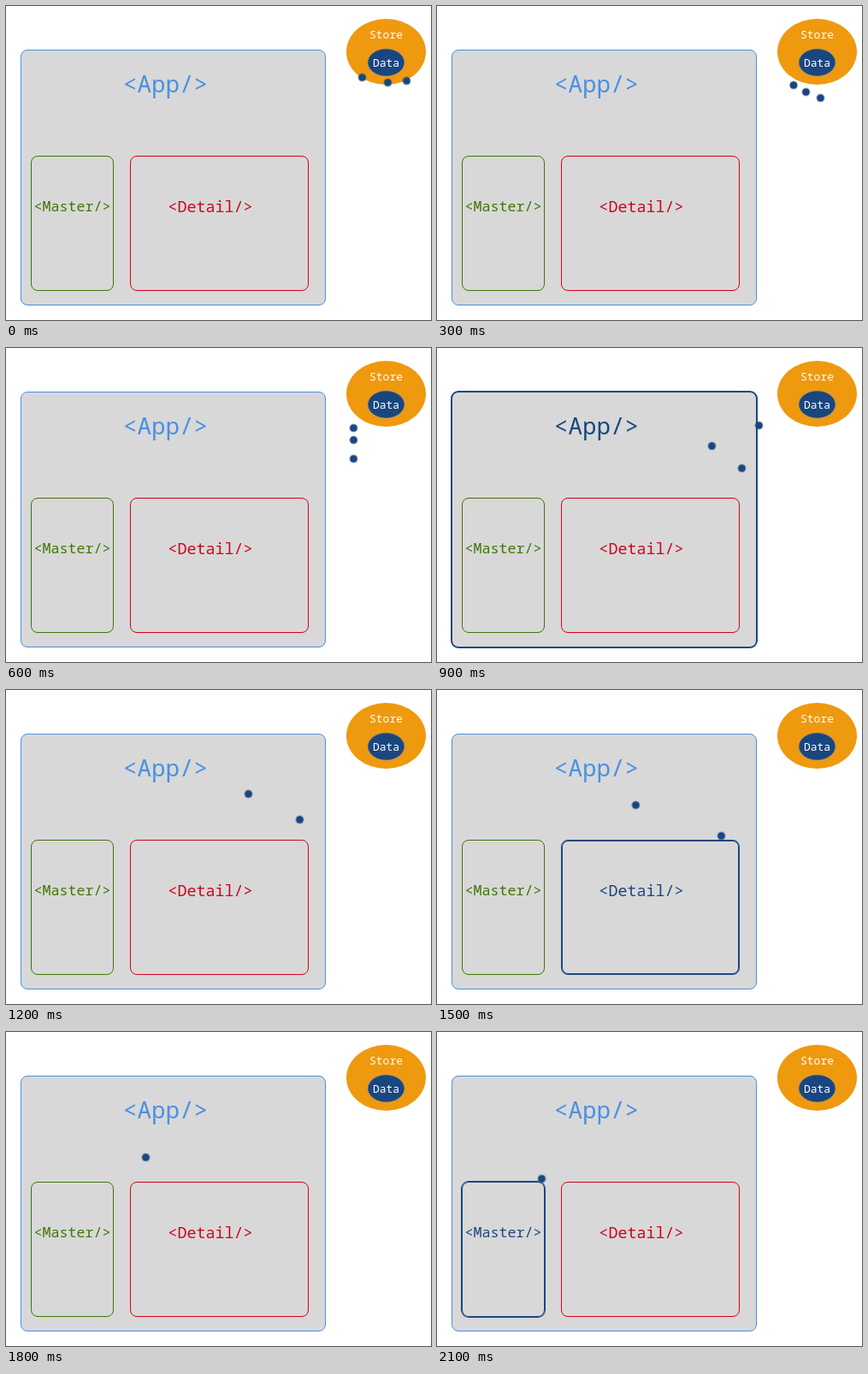
Recreate the animation shown at these times as an HTML page. Size 497 by 367 pixels, loop 2400 ms.

```html
<!DOCTYPE html>
<html lang="en">
<head>
<meta charset="utf-8">
<title>Store data flow</title>
<style>
  :root { --navy: #1a467f; --loop: 2400ms; }
  html, body { margin: 0; width: 100%; height: 100%; overflow: hidden; background: #fff; }
  svg { position: absolute; left: 0; top: 0; display: block; }
  text { font-family: "Noto Sans Mono", "DejaVu Sans Mono", monospace; font-weight: 500; text-anchor: middle; fill: currentColor; }

  .box { position: absolute; box-sizing: border-box; border: 1px solid; border-radius: 8px; }
  .box.app { left: 17px; top: 51px; width: 357px; height: 299px; background: #d8d8d8; }
  .box.master { left: 29px; top: 175px; width: 97px; height: 158px; }
  .box.detail { left: 145px; top: 175px; width: 209px; height: 158px; }

  /* Each component turns navy for one step when its data arrives. */
  .app, .master, .detail { --ring: 0 0 0 1px; color: var(--idle); animation: receive var(--loop) step-end infinite; }
  .app { --idle: #4a90e2; animation-delay: -1500ms; }
  .detail { --idle: #d0021b; --ring: inset 0 0 0 1px; animation-delay: -900ms; }
  .master { --idle: #417505; animation-delay: -300ms; }
  @keyframes receive {
    0% { color: var(--navy); box-shadow: var(--ring) var(--navy); }
    12.5%, 100% { color: var(--idle); box-shadow: none; }
  }

  .dot { fill: var(--navy); animation: var(--loop) step-end infinite; }
  .to-app { animation-name: to-app; }
  .to-detail { animation-name: to-detail; }
  .to-master { animation-name: to-master; }
  @keyframes to-app {
    0% { transform: translate(416.5px, 83.5px); }
    12.5% { transform: translate(417px, 92.5px); }
    25% { transform: translate(406.5px, 93.5px); }
    37.5% { transform: translate(376.5px, 90.5px); opacity: 1; }
    50%, 100% { transform: translate(376.5px, 90.5px); opacity: 0; }
  }
  @keyframes to-master {
    0% { transform: translate(446.5px, 89.5px); }
    12.5% { transform: translate(431.5px, 100.5px); }
    25% { transform: translate(406.5px, 107.5px); }
    37.5% { transform: translate(321.5px, 114.5px); }
    50% { transform: translate(283.5px, 121.5px); }
    62.5% { transform: translate(232.5px, 134.5px); }
    75% { transform: translate(163.5px, 146.5px); }
    87.5%, 100% { transform: translate(122.5px, 171.5px); }
  }
  @keyframes to-detail {
    0% { transform: translate(468.5px, 87.5px); }
    12.5% { transform: translate(448.5px, 107.5px); }
    25% { transform: translate(406.5px, 129.5px); }
    37.5% { transform: translate(356.5px, 140.5px); }
    50% { transform: translate(343.5px, 151.5px); }
    62.5% { transform: translate(332.5px, 170.5px); opacity: 1; }
    75%, 100% { transform: translate(332.5px, 170.5px); opacity: 0; }
  }
</style>
</head>
<body>
<div class="box app"></div>
<div class="box master"></div>
<div class="box detail"></div>
<svg width="497" height="367" viewBox="0 0 497 367">
  <ellipse cx="444.5" cy="53.5" rx="46.5" ry="38.5" fill="#ef990f"/>
  <ellipse cx="444.5" cy="66" rx="21.5" ry="16" fill="#1a467f" stroke="#979797" stroke-opacity=".6"/>
  <g color="#fff" font-size="13">
    <text x="444.5" y="38">Store</text>
    <text x="444.5" y="70.5">Data</text>
  </g>
  <text class="app" x="186.5" y="101" font-size="27.6">&lt;App/&gt;</text>
  <text class="master" x="77.5" y="240" font-size="16.7">&lt;Master/&gt;</text>
  <text class="detail" x="239" y="241" font-size="18.4">&lt;Detail/&gt;</text>
  <circle class="dot to-app" r="4.6"/>
  <circle class="dot to-master" r="4.6"/>
  <circle class="dot to-detail" r="4.6"/>
</svg>
</body>
</html>
```
